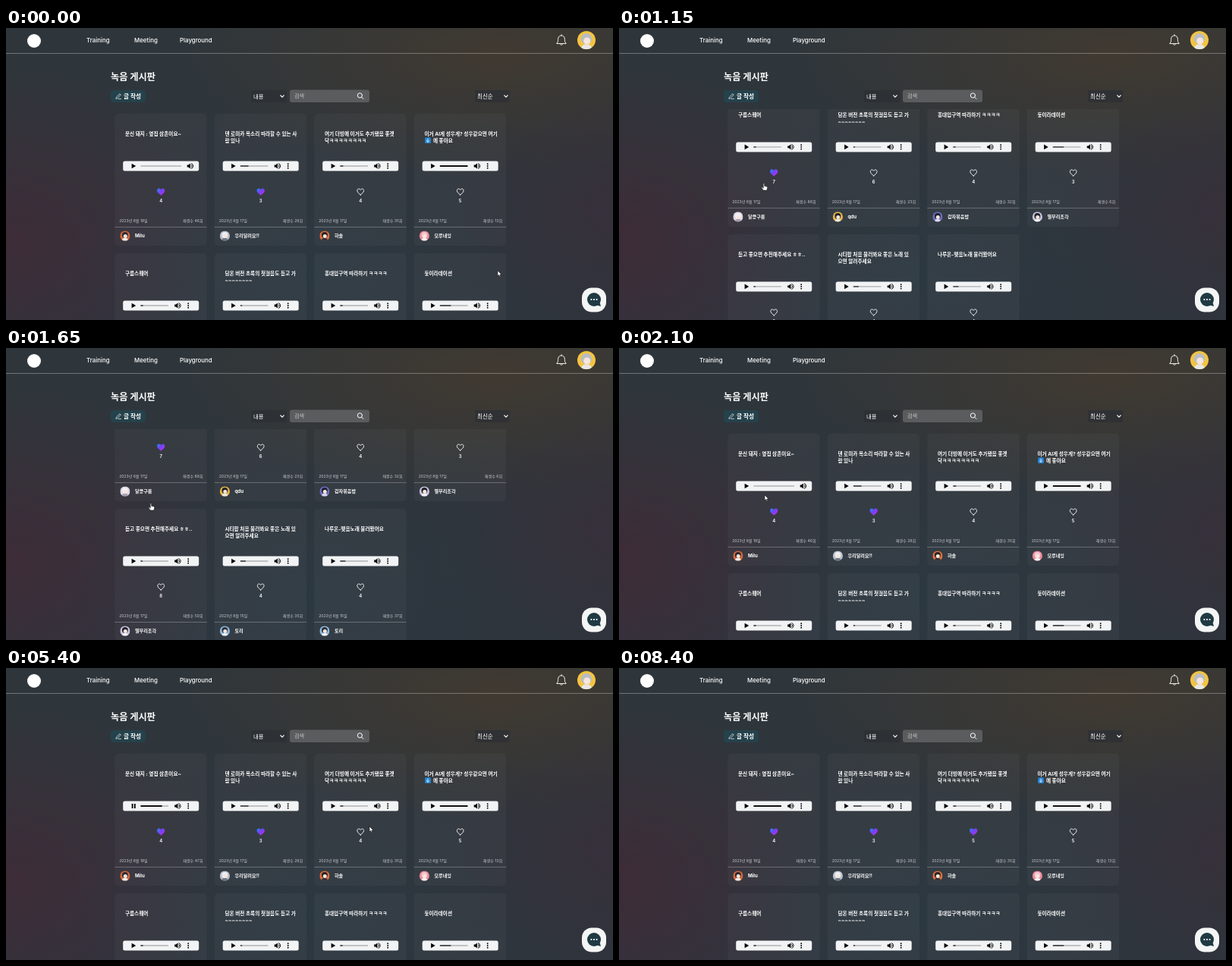
Animation, 800 px wide and 385 px high, one loop 9650 ms. Source, as an HTML page with a canvas:

```html
<!DOCTYPE html>
<html lang="ko">
<head>
<meta charset="utf-8">
<title>녹음 게시판</title>
<style>
  html, body { margin: 0; width: 100%; height: 100%; overflow: hidden; background: #30363d; }
  canvas { display: block; width: 800px; height: 385px; }
</style>
</head>
<body>
<canvas id="stage"></canvas>
<script>
const W = 800, H = 385, LOOP = 9650, STEP = 50;
const FONT = 'Inter, "Noto Sans CJK KR", "Noto Sans CJK", sans-serif';
const canvas = document.getElementById('stage');
const ctx = canvas.getContext('2d');
const dpr = window.devicePixelRatio || 1;
canvas.width = W * dpr;
canvas.height = H * dpr;

const COL_X = 143.2, COL_PITCH = 131.5, ROW_Y = 113, ROW_PITCH = 184;
const CARD_W = 121.5, CARD_H = 174, LIST_TOP = 107, MAX_SCROLL = 269;
const PLAY_START = 2650, PLAY_END = 6200, COUNT_UP = 3200, LIKE_AT = 7400;

// avatar: [background, hair, shirt]
const card = (title, heart, likes, day, plays, name, avatar, progress) =>
  ({ title, heart, likes, day, plays, name, avatar, progress });

const cards = [
  card(['문신 돼지 : 옆집 삼촌이요~'], 1, 4, 18, 46, 'Milu', ['#d9683a', '#2c2b33', '#f0ece6'], 0),
  card(['덴 로미카 목소리 따라할 수 있는 사', '람 있나'], 1, 3, 17, 28, '우리달려요!!', ['#b9c0cb', '#eceef2', '#6d7787'], .3),
  card(['여기 더빙에 이거도 추가됐음 좋겟', '닥ㅋㅋㅋㅋㅋㅋㅋㅋ'], 0, 4, 17, 35, '하솔', ['#e0703a', '#26232a', '#33343c'], .12),
  card(['이거 AI게 성우게? 성우같으면 여기', '\u2193 에 좋아요'], 0, 5, 17, 13, '모루네잉', ['#e98a9c', '#f6c6cf', '#f5eef0'], 1),
  card(['구름스퀘어'], 1, 7, 17, 88, '달콩구름', ['#dcd8e2', '#f3f0f4', '#a59fb0'], .1),
  card(['담온 버전 초록의 첫걸음도 듣고 가', '~~~~~~~~'], 0, 6, 17, 23, 'qdu', ['#e9b849', '#24222a', '#efe9dc'], .07),
  card(['홍대입구역 따라하기 ㅋㅋㅋㅋ'], 0, 4, 17, 32, '감자볶음밥', ['#6d6fc0', '#23222e', '#d8d9ee'], .1),
  card(['둥이라데이션'], 0, 3, 17, 6, '별무리조각', ['#c9c5e0', '#25232d', '#f2f0f6'], .4),
  card(['듣고 좋으면 추천해주세요 ㅎㅎ..'], 0, 8, 17, 50, '별무리조각', ['#c9c5e0', '#25232d', '#f2f0f6'], .08),
  card(['시티팝 처음 불러봐요 좋은 노래 있', '으면 알려주세요'], 0, 4, 15, 35, '토리', ['#8fbbe0', '#32343f', '#eef3f8'], .2),
  card(['나루온-맺음노래 불러봤어요'], 0, 4, 15, 37, '토리', ['#8fbbe0', '#32343f', '#eef3f8'], .2)
];

// pointer track: time, x, y
const track = [
  [0, 648, 320], [100, 648, 320], [800, 200, 212], [1000, 191, 205], [2000, 191, 205],
  [2100, 192, 194], [2550, 168, 182], [3700, 168, 182], [4150, 402, 176], [4600, 476, 208],
  [4850, 478, 209], [4950, 479, 209], [6450, 479, 209], [6600, 474.5, 209], [6950, 474.5, 209],
  [7150, 467, 213], [7850, 467, 213], [8350, 746, 243]
];

const clamp = v => Math.max(0, Math.min(1, v));
const easeOut = p => 1 - (1 - p) ** 3;

function scrollAt(t) {
  const down = easeOut(clamp((t - 1020) / 330));
  const up = easeOut(clamp((t - 1650) / 340));
  return MAX_SCROLL * (down - up);
}

function pointerAt(t) {
  const i = track.findIndex(k => k[0] > t);
  if (i < 0) return track[track.length - 1].slice(1);
  const [t0, x0, y0] = track[i - 1], [t1, x1, y1] = track[i];
  const p = (t - t0) / (t1 - t0);
  return [x0 + (x1 - x0) * p, y0 + (y1 - y0) * p];
}

function text(s, x, y, size, color = '#fff', weight = 400, align = 'left') {
  ctx.font = `${weight} ${size}px ${FONT}`;
  ctx.fillStyle = color;
  ctx.textAlign = align;
  ctx.fillText(s, x, y);
}

function box(x, y, w, h, r, color) {
  ctx.fillStyle = color;
  ctx.beginPath();
  ctx.roundRect(x, y, w, h, r);
  ctx.fill();
}

function disc(x, y, r, color) {
  ctx.fillStyle = color;
  ctx.beginPath();
  ctx.arc(x, y, r, 0, Math.PI * 2);
  ctx.fill();
}

function pathAt(d, x, y, { fill, stroke, width = 1, scale = 1 }) {
  const path = new Path2D(d);
  ctx.save();
  ctx.translate(x, y);
  ctx.scale(scale, scale);
  ctx.lineJoin = ctx.lineCap = 'round';
  if (fill) { ctx.fillStyle = fill; ctx.fill(path); }
  if (stroke) { ctx.strokeStyle = stroke; ctx.lineWidth = width; ctx.stroke(path); }
  ctx.restore();
}

function glow(x, y, rx, ry, rgb, alpha) {
  ctx.save();
  ctx.translate(x, y);
  ctx.scale(rx, ry);
  const g = ctx.createRadialGradient(0, 0, 0, 0, 0, 1);
  g.addColorStop(0, `rgba(${rgb},${alpha})`);
  g.addColorStop(.5, `rgba(${rgb},${alpha * .5})`);
  g.addColorStop(1, `rgba(${rgb},0)`);
  ctx.fillStyle = g;
  ctx.fillRect(-1, -1, 2, 2);
  ctx.restore();
}

function background() {
  const g = ctx.createLinearGradient(0, 0, 0, H);
  g.addColorStop(0, '#2f363b');
  g.addColorStop(1, '#2e353d');
  ctx.fillStyle = g;
  ctx.fillRect(0, 0, W, H);
  glow(0, 280, 300, 230, '66,41,54', .75);
  glow(650, 35, 420, 160, '72,59,44', .7);
  glow(810, 240, 230, 170, '60,44,56', .6);
  glow(400, 330, 300, 180, '42,60,70', .45);
  ctx.fillStyle = 'rgba(255,255,255,.3)';
  ctx.fillRect(0, 33, W, 1);
}

function avatar(x, y, r, [bg, hair, shirt]) {
  ctx.save();
  ctx.beginPath();
  ctx.arc(x, y, r, 0, Math.PI * 2);
  ctx.clip();
  ctx.fillStyle = bg;
  ctx.fillRect(x - r, y - r, r * 2, r * 2);
  disc(x, y + r * 1.05, r * .62, shirt);
  disc(x, y - r * .15, r * .6, hair);
  disc(x + r * .06, y + r * .08, r * .38, '#f6e6dc');
  ctx.restore();
}

function header() {
  disc(37, 17, 9, '#fff');
  text('Training', 106, 18.8, 7.9, '#fff', 500);
  text('Meeting', 169, 18.8, 7.9, '#fff', 500);
  text('Playground', 229, 18.8, 7.9, '#fff', 500);
  pathAt('M-6 4.3 C-4 2.5 -4.5 0 -4.3 -2 C-4 -5 -2 -6 0 -6 C2 -6 4 -5 4.3 -2 C4.5 0 4 2.5 6 4.3Z M0 -6V-7.2 M-1.6 5 C-1.4 7 1.4 7 1.6 5',
    732, 16, { stroke: '#eee', width: 1 });
  avatar(765, 16, 12, ['#f3c440', '#b9bdc4', '#e6e7e8']);
}

function chevron(x, y) {
  pathAt('M-2.2 -1.2 L0 1.2 L2.2 -1.2', x, y, { stroke: '#fff', width: 1.2 });
}

function toolbar() {
  text('녹음 게시판', 138, 68.9, 12.2, '#fff', 700);
  box(138, 82, 46, 16, 4, '#25424c');
  pathAt('M-3 3 L-2.5 1 L2 -3.3 L3.3 -2 L-1 2.5Z M0 3.4H3.5', 148, 90, { stroke: '#fff', width: .7 });
  text('글 작성', 155, 92.8, 7.7, '#fff', 700);
  box(323, 82, 47, 16, 2, '#2d3135');
  text('내용', 326, 92.5, 7.4);
  chevron(364, 90);
  box(374, 81.5, 105, 16.5, 3, '#5a5c5e');
  text('검색', 380, 92.3, 7.2, '#c4c5c6');
  pathAt('M2.5 -.6 A3.1 3.1 0 1 1 -3.7 -.6 A3.1 3.1 0 1 1 2.5 -.6 M1.7 1.7 L4 4', 467, 89.5, { stroke: '#fff', width: 1 });
  box(618, 82, 46, 16, 2, '#2f3134');
  text('최신순', 621, 92.5, 7.5);
  chevron(659, 90);
}

function player(x, y, progress, playing, loaded) {
  box(x, y - 6.5, 100, 13, 2.5, '#f1f3f4');
  if (playing) {
    box(x + 11.5, y - 3, 1.8, 6, 0, '#000');
    box(x + 14.7, y - 3, 1.8, 6, 0, '#000');
  } else {
    pathAt('M-2.6 -3.3 L3 0 L-2.6 3.3Z', x + 14, y, { fill: '#000' });
  }
  const len = loaded ? 37 : 54;
  box(x + 23, y - .9, len, 1.8, .9, '#bfc1c2');
  if (progress > 0) box(x + 23, y - .9, len * progress, 1.8, .9, playing || progress === 1 ? '#111' : '#55575a');
  const sx = x + (loaded ? 72 : 88.5);
  pathAt('M-4 -1.4 H-2.2 L.2 -3.6 V3.6 L-2.2 1.4 H-4Z', sx, y, { fill: '#000' });
  pathAt('M1.4 -1.6 A1.8 1.8 0 0 1 1.4 1.6 M1.6 -3.4 A3.6 3.6 0 0 1 1.6 3.4', sx, y, { stroke: '#000', width: .9 });
  if (loaded) for (const d of [-2.7, 0, 2.7]) disc(x + 86, y + d, .95, '#000');
}

function heart(x, y, filled) {
  const d = 'M0 4.6 C-2 2.8 -5 .8 -5 -1.8 C-5 -5 -1.4 -5.4 0 -2.9 C1.4 -5.4 5 -5 5 -1.8 C5 .8 2 2.8 0 4.6Z';
  if (!filled) return pathAt(d, x, y, { stroke: '#fff', width: 1.05, scale: .87 });
  const g = ctx.createLinearGradient(-4, -4, 4, 4);
  g.addColorStop(0, '#2f7df6');
  g.addColorStop(.5, '#7b3df5');
  g.addColorStop(1, '#d02df0');
  pathAt(d, x, y, { fill: g, scale: 1.02 });
}

function titleLine(s, x, y) {
  if (s[0] === '\u2193') {
    box(x + .8, y - 6.3, 7.6, 7.6, 1.2, '#2488dc');
    pathAt('M0 -2.2 V2 M-1.7 .4 L0 2.1 L1.7 .4', x + 4.6, y - 2.5, { stroke: '#fff', width: .8 });
    s = s.slice(2);
    x += 11.5;
  }
  text(s, x, y, 6.65, '#fff', 700);
}

function drawCard(c, i, t) {
  const x = COL_X + (i % 4) * COL_PITCH;
  const y = ROW_Y + Math.floor(i / 4) * ROW_PITCH;
  const first = i === 0, liked = i === 2 && t >= LIKE_AT;
  const playing = first && t >= PLAY_START && t < PLAY_END;
  const loaded = !first || t >= PLAY_START;
  const tick = Math.floor((t - PLAY_START) / 250) * 250;
  const progress = !first ? c.progress : t >= PLAY_END ? 1 : Math.max(0, tick / (PLAY_END - PLAY_START));
  const plays = c.plays + (first && t >= COUNT_UP ? 1 : 0);
  const mid = x + 61;

  box(x, y, CARD_W, CARD_H, 5, 'rgba(255,255,255,.032)');
  c.title.forEach((s, n) => titleLine(s, x + 13.7, y + 29 + n * 8.8));
  player(x + 11, y + 69, progress, playing, loaded);
  heart(mid, y + 103, c.heart || liked);
  text(c.likes + (liked ? 1 : 0), mid, y + 117.3, 6, '#fff', 600, 'center');
  text(`2023년 8월 ${c.day}일`, x + 6, y + 143.2, 5.05, '#c9cbce');
  text(`재생수 ${plays}회`, x + 116.4, y + 143.2, 5.1, '#c9cbce', 400, 'right');
  ctx.fillStyle = 'rgba(255,255,255,.25)';
  ctx.fillRect(x, y + 149, CARD_W, 1);
  avatar(x + 13.7, y + 161, 6.6, c.avatar);
  text(c.name, x + 26.7, y + 163.2, 6.15, '#fff', 700);
}

function chatButton() {
  box(759, 342.5, 32, 32, 13, '#f4f5f5');
  disc(775, 358, 9, '#1f3a42');
  pathAt('M2 7 L9 9 L7 2Z', 775, 358, { fill: '#1f3a42' });
  for (const d of [-3.6, 0, 3.6]) disc(775 + d, 358, 1.1, '#fff');
}

function pointer(t) {
  if (t >= 8400) return;
  const [x, y] = pointerAt(t);
  const hand = (t >= 880 && t < 2050) || (t >= 7050 && t < 7950);
  const style = { fill: '#fff', stroke: '#15171a', width: .6 };
  if (hand) {
    pathAt('M-.9 .4 C-.9 -.5 .7 -.5 .7 .4 V3.3 L3.8 4 C4.6 4.3 4.7 5 4.6 5.8 L4 9 H-.8 L-3 5.7 C-3.2 4.8 -2.2 4.5 -1.7 5.2 L-.9 6Z', x, y, style);
  } else {
    pathAt('M0 0 V7 L1.6 5.5 L2.7 8 L3.9 7.5 L2.8 5.1 H5Z', x, y, style);
  }
}

function render(t) {
  ctx.setTransform(dpr, 0, 0, dpr, 0, 0);
  background();
  header();
  toolbar();
  ctx.save();
  ctx.beginPath();
  ctx.rect(0, LIST_TOP, W, H - LIST_TOP);
  ctx.clip();
  ctx.translate(0, -scrollAt(t));
  cards.forEach((c, i) => drawCard(c, i, t));
  ctx.restore();
  chatButton();
  pointer(t);
}

const start = performance.now();
function loop() {
  const t = (performance.now() - start) % LOOP;
  render(Math.floor(t / STEP) * STEP);
  requestAnimationFrame(loop);
}
loop();
</script>
</body>
</html>
```
